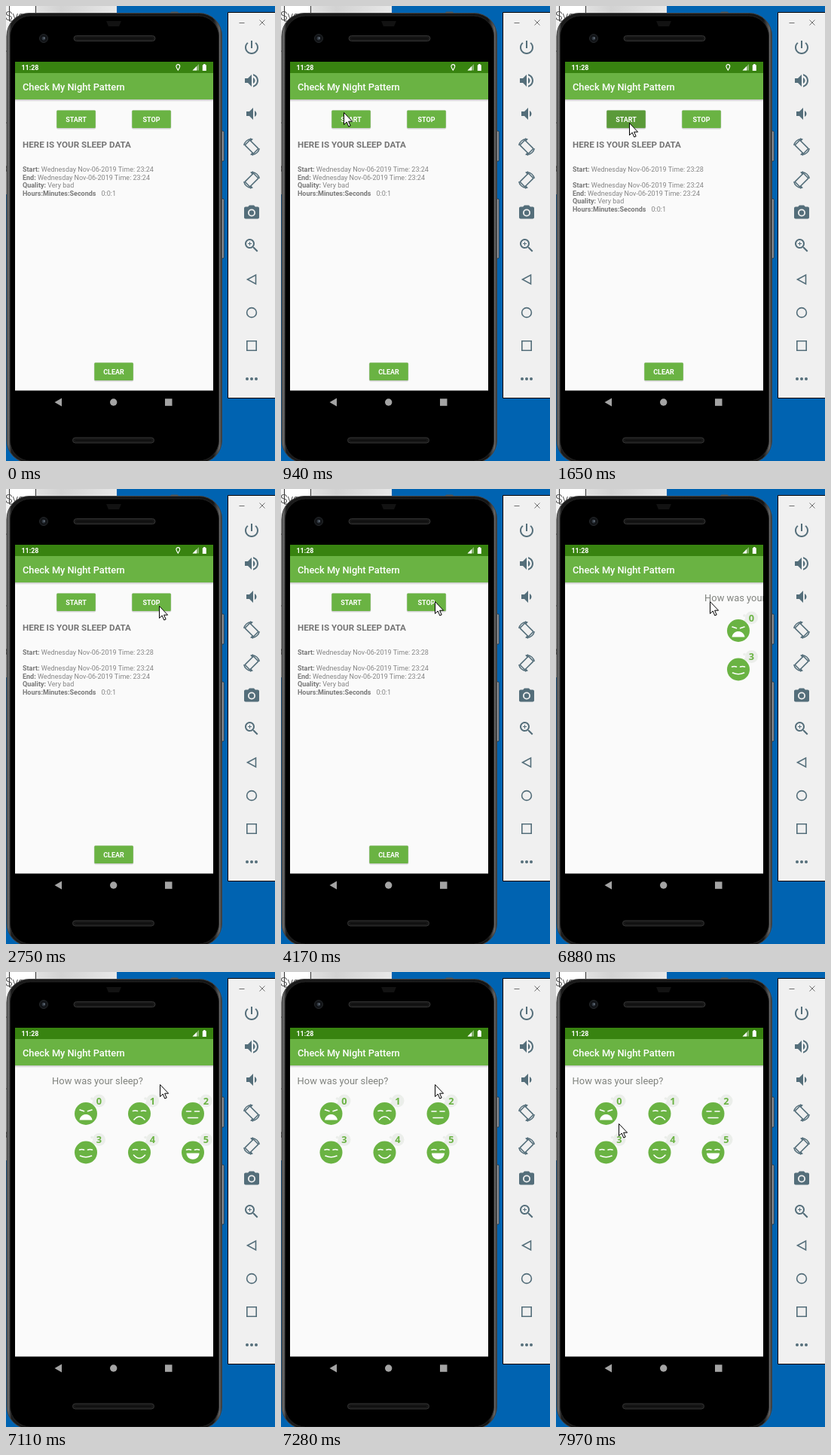
These frames come from a looping animation (357 px wide and 604 px high, 8 s). An HTML page:

```html
<!DOCTYPE html>
<html lang="en">
<head>
<meta charset="utf-8">
<title>Night log</title>
<style>
  html, body { margin: 0; width: 100%; height: 100%; overflow: hidden; background: #0063b1; }
  svg { display: block; width: 357px; height: 604px; }
  text { font-family: Roboto, "Noto Sans", sans-serif; white-space: pre; }
  .bar { font-size: 12.8px; font-weight: 500; fill: #fff; }
  .clock { font-size: 8.9px; font-weight: 700; fill: #fff; }
  .head { font-size: 11.64px; font-weight: 700; fill: #757575; }
  .log { font-size: 9.02px; fill: #868686; }
  .log .b { font-weight: 700; fill: #787878; }
  .ask { font-size: 12.9px; fill: #80837e; }
  .cap { font-size: 8.96px; font-weight: 700; fill: #fff; text-anchor: middle; }
  .num { font: 700 12.8px "Open Sans", sans-serif; fill: #6ab343; text-anchor: middle; }
  .line { fill: none; stroke: #fff; stroke-width: 1.6; stroke-linecap: round; }
  .tool { fill: #546e7a; }
  .o { fill: none; stroke: #546e7a; stroke-width: 1.6; }

  /* One 8 s clock for everything, 1% = 80 ms */
  .a { animation: 8s step-end infinite; }
  #mouse { animation-name: mouse; }
  #click { animation-name: click; }
  #pin { animation-name: pin; }
  #tracker { animation-name: tracker; }
  #quality { animation-name: quality; }
  #fresh { animation-name: fresh; }
  #older { animation-name: older; }
  #pressStart { animation-name: pressStart; }
  #pressStop { animation-name: pressStop; }

  @keyframes mouse {
    0% { transform: translate(202px, 620px); }
    3% { transform: translate(202px, 530px); }
    4% { transform: translate(196px, 482px); }
    4.875% { transform: translate(180px, 408px); }
    5.875% { transform: translate(154px, 318px); }
    6.875% { transform: translate(124px, 236px); }
    7.875% { transform: translate(99px, 178px); }
    8.875% { transform: translate(84px, 147px); }
    9.875% { transform: translate(78px, 135px); }
    11.75% { transform: translate(83px, 141px); }
    12.875% { transform: translate(92px, 150px); }
    14% { transform: translate(97px, 155px); }
    24.625% { transform: translate(97px, 157px); }
    30.5% { transform: translate(103px, 157px); }
    31.5% { transform: translate(128px, 157px); }
    32.5% { transform: translate(164px, 157px); }
    33.375% { transform: translate(192px, 156px); }
    34.375% { transform: translate(203px, 155px); }
    36.5% { transform: translate(203px, 151px); }
    37.375%, 90.875% { transform: translate(204px, 149px); }
    91.875% { transform: translate(192px, 167px); }
    92.875% { transform: translate(175px, 186px); }
    93.875% { transform: translate(151px, 196px); }
    94.875% { transform: translate(121px, 202px); }
    95.75% { transform: translate(101px, 204px); }
    96.75% { transform: translate(91px, 205px); }
    98.625% { transform: translate(86px, 203px); }
    99.625%, 100% { transform: translate(83px, 201px); }
  }
  @keyframes click {
    0%, 20.625%, 81.25%, 100% { opacity: 0; }
    18.75%, 79.125% { opacity: .75; }
  }
  @keyframes pin {
    0% { opacity: 1; }
    52.125%, 100% { opacity: 0; }
  }
  @keyframes tracker {
    0% { visibility: visible; }
    83.25%, 100% { visibility: hidden; }
  }
  @keyframes quality {
    0% { transform: translateX(263px); }
    83.25% { transform: translateX(261px); }
    84.25% { transform: translateX(243px); }
    85.125% { transform: translateX(213px); }
    86% { transform: translateX(175.5px); }
    87.125% { transform: translateX(119px); }
    88% { transform: translateX(76px); }
    88.875% { transform: translateX(39.5px); }
    90% { transform: translateX(9px); }
    90.875%, 100% { transform: translateX(0); }
  }
  @keyframes fresh {
    0% { opacity: 0; }
    20.625%, 100% { opacity: 1; }
  }
  @keyframes older {
    0% { transform: translateY(0); }
    20.625%, 100% { transform: translateY(21px); }
  }
  @keyframes pressStart {
    0%, 22.75%, 100% { opacity: 0; }
    18.75% { opacity: .06; }
    19.75% { opacity: .1; }
    20.625% { opacity: .14; }
    21.75% { opacity: .07; }
  }
  @keyframes pressStop {
    0% { opacity: 0; }
    79.125% { opacity: .06; }
    80.25% { opacity: .1; }
    81.25%, 100% { opacity: .14; }
  }
</style>
</head>
<body>
<svg viewBox="0 0 357 604" xmlns="http://www.w3.org/2000/svg">
  <defs>
    <linearGradient id="wall">
      <stop offset="0" stop-color="#f2f2f2"/><stop offset=".5" stop-color="#d2d2d2"/><stop offset="1" stop-color="#e8e8e8"/>
    </linearGradient>
    <linearGradient id="rim">
      <stop offset="0" stop-color="#3a3a3a"/><stop offset=".007" stop-color="#707070"/><stop offset=".022" stop-color="#1a1a1a"/>
      <stop offset=".96" stop-color="#141414"/><stop offset=".99" stop-color="#666"/><stop offset="1" stop-color="#2a2a2a"/>
    </linearGradient>
    <linearGradient id="shade" x2="0" y2="1">
      <stop offset="0" stop-color="#000" stop-opacity=".22"/><stop offset="1" stop-color="#000" stop-opacity="0"/>
    </linearGradient>
    <clipPath id="screen"><path d="M12 74h263v436.500H12z"/></clipPath>
    <rect id="key" width="51.500" height="23.500" rx="1.300"/>
    <g id="btn">
      <rect x="-.5" y="-.2" width="52.500" height="25" rx="1.800" opacity=".16"/>
      <use href="#key" fill="#6ab343"/>
    </g>
    <g id="face">
      <g fill="#ebeeea">
        <circle cx="17.500" cy="-17" r="8.500"/><circle cx="10" cy="-13" r="2.600"/><circle cx="8" cy="-20" r="1.800"/>
      </g>
      <circle r="15" fill="#6ab343"/>
    </g>
    <path id="eyes" class="line" d="M-8.500-3.500q3-1 6 0M2.500-3.500q3-1 6 0"/>
    <g id="turn">
      <rect class="o" x="-4.700" y="-8" width="9.400" height="16" rx="1" transform="rotate(-45)"/>
      <path class="o" d="M-10.200-2A10.300 10.300 0 0 1-1-10.400M10.200 2A10.300 10.300 0 0 1 1 10.400"/>
      <path d="M-2-11.800l4 1.500-3.400 3.200zM2 11.800l-4-1.500 3.400-3.200z"/>
    </g>
  </defs>

  <!-- Desktop -->
  <path fill="#0063b1" d="M0 0h357v604H0z"/>
  <path fill="url(#wall)" d="M0 0h147v40H0z"/>
  <path fill="#d8d8d8" d="M0 40h4v210H0z"/>
  <path fill="#fff" stroke="#333" d="M4.500-2h35v22h-35z"/>
  <text x="-1" y="18.500" font-size="16" font-weight="300" fill="#444">Sys</text>
  <path stroke="#444" d="M0 212q2 4 0 8M0 60h2M0 155h2" fill="none"/>

  <!-- Phone -->
  <rect x="218" y="7.500" width="11" height="6" rx="2" fill="#555"/>
  <g fill="#9298a0" stroke="#2a2a2a" stroke-width=".8">
    <rect x="284" y="166" width="5.200" height="40" rx="1.200"/>
    <rect x="284" y="256" width="5.200" height="79" rx="1.200"/>
  </g>
  <rect x="1" y="9.500" width="285.500" height="597" rx="30" fill="url(#rim)" stroke="#444"/>
  <rect x="5.500" y="13" width="277" height="591" rx="27" stroke="#222"/>
  <path fill="#121212" d="M133 20h20l-3 7h-14z"/>
  <circle cx="50" cy="43" r="5.500" fill="#121417" stroke="#24272a"/>
  <circle cx="50" cy="43" r="2.400" fill="#333b44"/>
  <circle cx="50.700" cy="42.600" r=".8" fill="#8a959f"/>
  <g fill="#171717" stroke="#343434">
    <rect x="90" y="39.500" width="108" height="7" rx="3.500"/>
    <rect x="88.500" y="573" width="108" height="7" rx="3.500"/>
  </g>
  <path stroke="#0b0b0b" d="M93 43h102M92 576.500h101"/>
  <path d="M12 74h263v467H12z"/>
  <g fill="#a4a4a4">
    <path d="M64.500 526l9.500-5.500v11z"/><circle cx="142.700" cy="526" r="4.700"/><path d="M211 521.300h9.500v9.500H211z"/>
  </g>

  <!-- App -->
  <g clip-path="url(#screen)">
    <path fill="#fafafa" d="M12 74h263v437H12z"/>
    <path fill="#6ab343" d="M12 89h263v35H12z"/>
    <path fill="#388310" d="M12 74h263v15H12z"/>
    <path fill="url(#shade)" d="M12 124h263v3H12z"/>
    <text class="clock" x="20.500" y="84.800">11:28</text>
    <path id="pin" class="a" fill="none" stroke="#fff" stroke-width="1.200" d="M228.300 85.200c-1.200-1.800-2.400-3.700-2.400-5.200a2.400 2.400 0 0 1 4.800 0c0 1.500-1.200 3.400-2.400 5.200z"/>
    <path fill="#fff" opacity=".4" d="M256 77v8.500h-8.500z"/>
    <path fill="#fff" d="M253 80v5.500h-5.500zM260.800 78.200h1.300V77h2.400v1.200h1.300v7.800h-5z"/>
    <text class="bar" x="22" y="111.700">Check My Night Pattern</text>

    <g id="tracker" class="a">
      <use href="#btn" x="67.300" y="138.600"/>
      <use id="pressStart" class="a" href="#key" x="67.300" y="138.600"/>
      <text class="cap" x="93" y="153.700">START</text>
      <use href="#btn" x="167.300" y="138.600"/>
      <use id="pressStop" class="a" href="#key" x="167.300" y="138.600"/>
      <text class="cap" x="193" y="153.700">STOP</text>
      <use href="#btn" x="117.300" y="473.600"/>
      <text class="cap" x="143" y="488.700">CLEAR</text>
      <text class="head" x="22" y="188.300">HERE IS YOUR SLEEP DATA</text>
      <text id="fresh" class="log a" x="22" y="220.400"><tspan class="b">Start:</tspan> Wednesday Nov-06-2019 Time: 23:28</text>
      <g id="older" class="log a">
        <text x="22" y="220.400"><tspan class="b">Start:</tspan> Wednesday Nov-06-2019 Time: 23:24</text>
        <text x="22" y="230.900"><tspan class="b">End:</tspan> Wednesday Nov-06-2019 Time: 23:24</text>
        <text x="22" y="241.400"><tspan class="b">Quality:</tspan> Very bad</text>
        <text x="22" y="251.900"><tspan class="b">Hours:Minutes:Seconds</tspan><tspan x="126.500">0:0:1</tspan></text>
      </g>
    </g>

    <g id="quality" class="a">
      <text class="ask" x="21.600" y="148.500">How was your sleep?</text>
      <g transform="translate(66.500 188)">
        <use href="#face"/><text class="num" x="17.500" y="-12.500">0</text>
        <path class="line" d="M-8-5l5.500 1.800M8-5l-5.500 1.800"/>
        <path fill="#fff" d="M-8.500 8.500C-7-1.500 7-1.500 8.500 8.500z"/>
      </g>
      <g transform="translate(137.500 188)">
        <use href="#face"/><use href="#eyes"/><text class="num" x="17.500" y="-12.500">1</text>
        <path class="line" d="M-7 8q7-8 14 0"/>
      </g>
      <g transform="translate(208.500 188)">
        <use href="#face"/><text class="num" x="17.500" y="-12.500">2</text>
        <path class="line" d="M-8.500-3h6M2.500-3h6M-6.500 5.500h13"/>
      </g>
      <g transform="translate(66.500 239.500)">
        <use href="#face"/><use href="#eyes"/><text class="num" x="17.500" y="-12.500">3</text>
        <path class="line" d="M-7.500 4.500q7.500 3.500 15 0"/>
      </g>
      <g transform="translate(137.500 239.500)">
        <use href="#face"/><use href="#eyes"/><text class="num" x="17.500" y="-12.500">4</text>
        <path class="line" d="M-7.500 3.500q7.500 8.500 15 0"/>
      </g>
      <g transform="translate(208.500 239.500)">
        <use href="#face"/><use href="#eyes"/><text class="num" x="17.500" y="-12.500">5</text>
        <path fill="#fff" d="M-8.500 1h17C8 12-8 12-8.500 1z"/>
      </g>
    </g>
  </g>

  <!-- Emulator toolbar -->
  <path fill="#f0f0f0" stroke="#000" d="M294.500 8.500h70v512h-70z"/>
  <path fill="none" stroke="#6e6e6e" d="M309.500 22.500h7M336.500 18.500l7 7m0-7l-7 7"/>
  <g class="tool">
    <path transform="translate(314 43)" d="M13 3h-2v10h2V3zm4.830 2.170l-1.420 1.420C17.990 7.860 19 9.810 19 12c0 3.870-3.130 7-7 7s-7-3.130-7-7c0-2.190 1.010-4.140 2.580-5.420L6.170 5.170C4.230 6.820 3 9.260 3 12c0 4.970 4.030 9 9 9s9-4.030 9-9c0-2.740-1.230-5.180-3.170-6.830z"/>
    <path transform="translate(314 87)" d="M3 9v6h4l5 5V4L7 9H3zm13.500 3c0-1.770-1.020-3.290-2.500-4.030v8.050c1.480-.73 2.500-2.250 2.500-4.020zM14 3.230v2.060c2.890.86 5 3.540 5 6.710s-2.110 5.850-5 6.710v2.060c4.010-.91 7-4.490 7-8.770s-2.990-7.860-7-8.770z"/>
    <path transform="translate(314 131)" d="M18.500 12c0-1.770-1.020-3.290-2.500-4.030v8.050c1.480-.73 2.500-2.250 2.500-4.020zM5 9v6h4l5 5V4L9 9H5z"/>
    <use href="#turn" transform="translate(326 187)"/>
    <use href="#turn" transform="translate(326 231) scale(-1 1)"/>
    <path fill-rule="evenodd" transform="translate(314 262.500)" d="M9 2L7.170 4H4c-1.100 0-2 .9-2 2v12c0 1.100.9 2 2 2h16c1.100 0 2-.9 2-2V6c0-1.100-.9-2-2-2h-3.170L15 2H9zm3 15a5 5 0 1 1 0-10 5 5 0 0 1 0 10z"/>
    <circle cx="326" cy="274.500" r="3.200"/>
    <path fill-rule="evenodd" transform="translate(314 306)" d="M15.500 14h-.79l-.28-.27A6.500 6.500 0 1 0 13.730 14.430l.27.28v.79l5 4.990L20.490 19zM9.500 14a4.500 4.500 0 1 1 0-9 4.500 4.500 0 0 1 0 9zM12 10h-2v2H9v-2H7V9h2V7h1v2h2z"/>
    <path class="o" d="M320.500 363l11-6v12z"/>
    <circle class="o" cx="326" cy="407" r="6.400"/>
    <path class="o" d="M319.800 444.800h12.400v12.400h-12.400z"/>
    <circle cx="320" cy="495" r="2"/><circle cx="326" cy="495" r="2"/><circle cx="332" cy="495" r="2"/>
  </g>

  <g id="mouse" class="a">
    <circle id="click" class="a" cx="1" cy="1" r="12" fill="#d8d810"/>
    <path fill="#fff" stroke="#000" d="M.5.500v16l3.700-3.500 2.600 6 2.400-1-2.600-5.800h5z"/>
  </g>
</svg>
</body>
</html>
```
